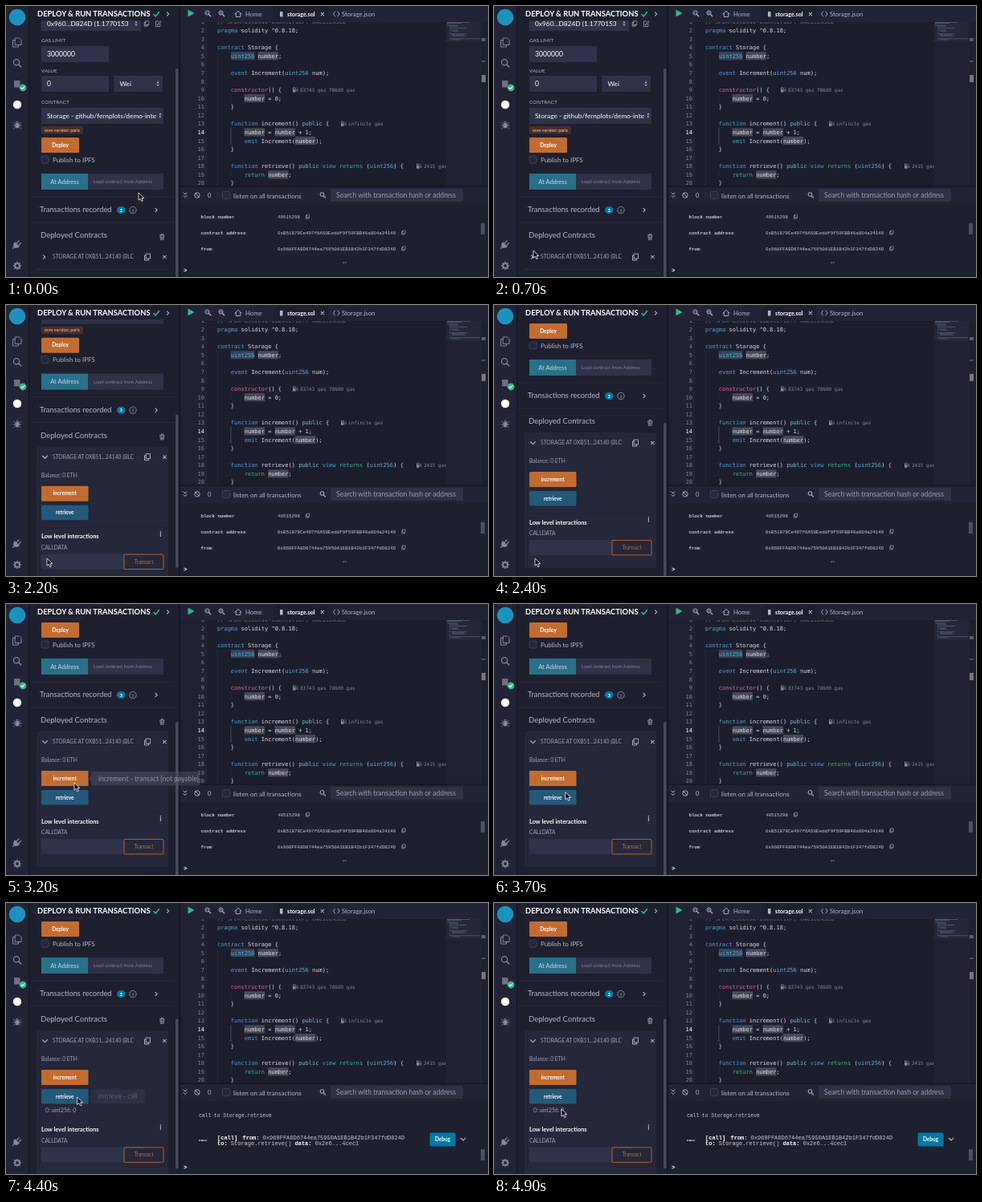
Animation of 600 by 338 pixels, one loop 5 s. Source, as an HTML page:

```html
<!DOCTYPE html>
<html lang="en">
<head>
<meta charset="utf-8">
<title>Deploy and run</title>
<style>
html, body { margin: 0; width: 100%; height: 100%; overflow: hidden; background: #1e2030; }
svg { display: block; width: 600px; height: 338px; }
text { font-family: Lato, "Open Sans", sans-serif; white-space: pre; }
.code { font-family: "DejaVu Sans Mono", monospace; }
.term { font-family: "Liberation Mono", "Courier New", monospace; }
</style>
</head>
<body>
<svg id="stage" viewBox="0 0 600 338">
  <defs>
    <clipPath id="sideClip"><path d="M30 18H216V338H30Z"/></clipPath>
    <clipPath id="codeClip"><path d="M218 20H600V225H218Z"/></clipPath>
    <clipPath id="termClip"><path d="M218 247H600V321H218Z"/></clipPath>
    <clipPath id="selectClip"><path d="M44 127H190V147H44Z"/></clipPath>
  </defs>
  <rect width="600" height="338" fill="#1e2030"/>
  <g id="rail"></g>
  <g clip-path="url(#sideClip)">
    <g id="panel">
      <g id="form"></g>
      <g id="card"><g id="result"></g><g id="lower"></g></g>
      <g id="row"></g>
    </g>
    <rect id="sideThumb" x="211" width="3.6" rx="1" fill="#454a5c"/>
  </g>
  <g id="head"></g>
  <g id="code" clip-path="url(#codeClip)"></g>
  <g id="tools"></g>
  <g clip-path="url(#termClip)">
    <g id="log"></g>
    <rect id="termThumb" x="591" width="5" height="14" fill="#4c4f62"/>
  </g>
  <g id="tipInc"></g>
  <g id="tipGet"></g>
  <path id="cursor" d="M0 0V9.2L2.2 7.2L3.8 10.6L5.4 9.9L3.9 6.6H6.8Z" fill="#000" stroke="#fff" stroke-width=".8" stroke-linejoin="round"/>
</svg>
<script>
const $ = id => document.getElementById(id);
const WHITE = '#fff', PALE = '#b4b6c8', GREY = '#85879a', FIELD = '#2f3248', BASE = '#1e2030';
const CARD = '#25273a', BAR = '#222336', DARK = '#171826', ORANGE = '#c26c31', TEAL = '#2a7089', GREEN = '#32ba89';

const add = (id, ...parts) => $(id).insertAdjacentHTML('beforeend', parts.join(''));
const safe = s => s.replace(/&/g, '&amp;').replace(/</g, '&lt;');
const rect = (x, y, w, h, fill, more = '') =>
  `<rect x="${x}" y="${y}" width="${w}" height="${h}" fill="${fill}" ${more}/>`;
const line = (d, color = PALE, width = 1) =>
  `<path d="${d}" fill="none" stroke="${color}" stroke-width="${width}" stroke-linecap="round" stroke-linejoin="round"/>`;
const fill = (d, color = PALE) => `<path d="${d}" fill="${color}"/>`;
const dot = (x, y, r, color) => `<circle cx="${x}" cy="${y}" r="${r}" fill="${color}"/>`;
const ring = (x, y, r, color = PALE, w = .8) =>
  `<circle cx="${x}" cy="${y}" r="${r}" fill="none" stroke="${color}" stroke-width="${w}"/>`;
// y is the middle of the capitals
const text = (x, y, size, s, color = PALE, more = '') =>
  `<text x="${x}" y="${(y + size * .36).toFixed(2)}" font-size="${size}" fill="${color}" ${more}>${safe(s)}</text>`;
const MID = 'text-anchor="middle" ', BOLD = 'font-weight="700" ', TERM = 'class="term" ';

const copy = (x, y, k = 1, color = PALE) =>
  `<g transform="translate(${x} ${y}) scale(${k})">` +
  line('M-1.5 -4H3.5V2H-1.5ZM-1.5 -2H-3.5V4H1.5V2', color, .9) + '</g>';
const cross = (x, y, r = 1.7) =>
  line(`M${x - r} ${y - r}L${x + r} ${y + r}M${x + r} ${y - r}L${x - r} ${y + r}`, PALE, 1.1);
const right = (x, y, color = PALE) => line(`M${x - 1} ${y - 2.2}L${x + 1.2} ${y}L${x - 1} ${y + 2.2}`, color, 1.1);
const down = (x, y) => line(`M${x - 3} ${y - 1.4}L${x} ${y + 1.6}L${x + 3} ${y - 1.4}`, PALE, 1.2);
const lens = (x, y, r, inner = '') =>
  ring(x, y, r, PALE, 1) + line(`M${x + r * .75} ${y + r * .75}L${x + r * 1.7} ${y + r * 1.7}`, PALE, 1.2) +
  (inner ? line(inner, PALE, .6) : '');
const arrows = (x, y) => fill(`M${x - 1.6} ${y - .8}h3.2l-1.6 -2.1ZM${x - 1.6} ${y + .8}h3.2l-1.6 2.1Z`);
const box = (x, y) => rect(x, y, 9, 9, '#26283b', 'stroke="#44475c" stroke-width=".8" rx="1"');
const button = (x, y, w, h, s, color) =>
  rect(x, y, w, h, color, 'rx="1.5"') + text(x + w / 2, y + h / 2, 6.5, s, WHITE, MID + BOLD);

function drawRail() {
  const spokes = [...Array(8).keys()].map(i => {
    const c = Math.cos(i * Math.PI / 4), s = Math.sin(i * Math.PI / 4);
    return `M${14 + 3.4 * c} ${324 + 3.4 * s}L${14 + 4.4 * c} ${324 + 4.4 * s}`;
  }).join('');
  add('rail', rect(0, 0, 28, 338, BAR), rect(28, 0, 1.5, 338, DARK),
    dot(14, 14, 10.3, '#1c93bd'),
    line('M11.5 40H16.5L19 42.5V48.5H11.5ZM11.5 42.5H8.5V51H15.5V48.5', GREY, 1),
    ring(13, 70.3, 3.6, GREY, 1.2), line('M15.800 73L18.800 76', GREY, 1.4),
    rect(10, 93, 7.5, 8.5, '#6d7080'),
    dot(21, 102, 4.4, GREEN), line('M19 102L20.5 103.5L23 100.5', WHITE, 1.1),
    dot(14, 123, 5.2, WHITE),
    `<ellipse cx="14" cy="149" rx="2.6" ry="3.6" fill="${GREY}"/>`,
    line('M9.500 145.500L11.5 147M18.500 145.500L16.5 147M9 149H19M9.500 153L11.5 151M18.500 153L16.5 151M12.500 144.8Q14 142.8 15.5 144.8', GREY, .9),
    fill('M11 294L17 300Q13 303.5 10 301Q7.8 298 11 294Z', GREY),
    line('M9.8 301L8.5 302.5M13.5 295.5L16 293M16 298L18.5 295.5', GREY, 1.2),
    ring(14, 324, 2.800, GREY, 1.7), line(spokes, GREY, 1.6));
}

function drawForm() {
  add('form',
    rect(44, 11, 124, 20, FIELD), text(51, 22, 8.35, '0x960...D824D (1.1770153', WHITE), arrows(162, 22),
    copy(175, 22, .8), line('M189.500 19H186.500V25.5H192V22.5M188.5 23.5L189 21.8L192.3 18.700L193.3 19.8L190 23Z', PALE, .7),
    text(44, 43, 6.3, 'GAS LIMIT'), rect(44, 50, 84, 20, FIELD), text(51, 60, 8.6, '3000000', WHITE),
    text(44, 80.5, 6.3, 'VALUE'), rect(44, 87, 84, 20, FIELD), text(51, 97, 8.6, '0', WHITE),
    rect(134, 87, 61, 20, FIELD), text(141.500, 97, 8.3, 'Wei', WHITE), arrows(189, 97),
    text(44, 120, 6.5, 'CONTRACT'), rect(44, 127, 152, 20, FIELD),
    '<g clip-path="url(#selectClip)">', text(51, 136.5, 8.35, 'Storage - github/fernplots/demo-inte', WHITE), '</g>',
    arrows(192, 136.5),
    rect(44, 150, 52, 9.500, '#47302b', 'rx="1.5"'),
    text(70, 154.7, 5.5, 'evm version: paris', '#e6a070', MID + BOLD),
    button(44, 164, 47, 19, 'Deploy', ORANGE),
    box(44, 187), text(58, 191.8, 8, 'Publish to IPFS'),
    rect(44, 209, 58, 20, TEAL), text(73, 219, 7.5, 'At Address', '#c9d5de', MID),
    rect(102, 209, 94, 20, FIELD), text(109, 219, 6.05, 'Load contract from Address', GREY),
    line('M30 238H210M30 270H210', '#292b3d', 1),
    text(42, 254, 9.3, 'Transactions recorded'),
    rect(138, 250, 10.5, 9, '#007aa6', 'rx="4.5"'), text(143.3, 254.5, 6, '3', WHITE, MID + BOLD),
    ring(158, 254.5, 4.2, PALE, .7), text(158, 254.5, 6, 'i', PALE, MID + BOLD), right(187, 254.5),
    text(43, 286, 9.5, 'Deployed Contracts'),
    line('M191.500 286H197M193.300 285.500V284.500H195.200V285.500M192 286.500L192.400 291.3H196.100L196.500 286.500M193.6 287.7V290M194.900 287.7V290', PALE, .7),
    line('M38 328.5H202', '#2b2d40', 1));

  add('row', '<g id="closed">', right(47.5, 313), '</g><g id="open">', down(48.5, 313), '</g>',
    text(58, 313, 6.7, 'STORAGE AT 0XB51...24140 (BLC', '#9c9db6'), copy(176, 313), cross(197.5, 313));

  $('card').insertAdjacentHTML('afterbegin',
    `<rect id="cardBox" x="38" y="300" width="164" fill="${CARD}" rx="1"/>` +
    text(44, 336, 6.7, 'Balance: 0 ETH', '#a2a3bd') +
    button(44, 349, 58.5, 19, 'increment', ORANGE) + button(44, 373, 58.5, 18.5, 'retrieve', '#25597a'));
  add('result', text(49, 399.5, 6.8, '0: uint256: 0', '#a2a3bd'));
  add('lower', line('M38 401H202', '#222437', 1),
    text(44, 412, 7.4, 'Low level interactions', WHITE, BOLD), text(192.5, 409, 9, 'i', PALE, MID + BOLD),
    text(44, 426, 6.6, 'CALLDATA', '#a2a3bd'), rect(44, 434, 103, 19, FIELD),
    rect(147, 434.4, 49, 18.5, 'none', `stroke="${ORANGE}" stroke-width=".9" rx="1"`),
    text(171.5, 443.5, 6.6, 'Transact', ORANGE, MID));
}

function drawHead() {
  add('head', text(39, 10, 9.4, 'DEPLOY & RUN TRANSACTIONS', WHITE, BOLD),
    line('M184 10.5L186.3 13L190.5 7.5', GREEN, 1.5), right(201.5, 10),
    rect(215, 0, 2.5, 338, DARK),
    rect(217.5, 0, 383, 20, BAR), rect(333, 0, 68.5, 20, BASE),
    fill('M226.5 4.5L234.5 9L226.5 13.5Z', GREEN),
    lens(250.5, 8.5, 2.5, 'M249.5 8.5H251.5'), lens(267.5, 8.5, 2.5, 'M266.5 8.5H268.5M267.5 7.5V9.5'),
    line('M285 10L289 6.3L293 10M286.3 9.5V13.5H291.7V9.5', PALE, .9),
    text(298, 10, 7.75, 'Home'),
    rect(341, 7, 3.500, 6.500, PALE), text(350, 10, 7.2, 'storage.sol', WHITE, BOLD), cross(394, 10),
    line('M409.5 7L407.5 10L409.5 13M413 7L415 10L413 13', PALE, .9), text(418, 10, 7.7, 'Storage.json'));
}

function drawCode() {
  const src = `// SPDX-License-Identifier: UNLICENSED
pragma solidity ^0.8.18;

contract Storage {
    uint256 number;

    event Increment(uint256 num);

    constructor() {
        number = 0;
    }

    function increment() public {
        number = number + 1;
        emit Increment(number);
    }

    function retrieve() public view returns (uint256) {
        return number;
    }`.split('\n');
  const hues = {};
  const paint = (color, words) => words.split(' ').forEach(w => hues[w] = color);
  paint('#4c9fd0', 'pragma contract event function emit view');
  paint('#5fa8dc', 'uint256');
  paint('#7cc0dc', 'public');
  paint(GREEN, 'return returns');
  paint('#e0668c', 'constructor');
  const adv = 4.214, gas = { 9: [357, '83743 gas 78600 gas'], 13: [417, 'infinite gas'], 18: [511, '2415 gas'] };
  add('code', rect(250, 20, 298, 205, '#1d1e2d'), rect(217.5, 20, 32.5, 205, '#202132'),
    line('M263.3 57V225M280 109V120M280 204V215', '#323447', .6), line('M280 152V173', '#6a6d7d', .6));
  src.forEach((s, i) => {
    const n = i + 1, y = 30.5 + (n - 2) * 10.58;
    for (const m of s.matchAll(n === 5 ? /uint256|number/g : /\bnumber\b/g))
      add('code', rect(263 + m.index * adv, y - 5, m[0].length * adv, 10, m[0] === 'number' ? '#484a57' : '#34465a'));
    const body = n === 1 ? safe(s)
      : safe(s).replace(/\w+/g, w => hues[w] ? `<tspan fill="${hues[w]}">${w}</tspan>` : w);
    add('code', text(247, y, 7, '' + n, n === 14 ? WHITE : '#85879a', 'class="code" text-anchor="end"'),
      `<text class="code" x="263" y="${y + 2.5}" font-size="7" fill="${n === 1 ? '#65727c' : '#dcdde6'}">${body}</text>`);
    if (gas[n]) {
      const [x, s] = gas[n];
      add('code', rect(x, y - 3, 3.5, 6, GREY), rect(x + .8, y - 2.2, 2, 1.5, BASE),
        line(`M${x + 4} ${y}H${x + 5}V${y + 2}H${x + 6}V${y - 1.5}L${x + 5} ${y - 2.5}`, GREY, .6),
        text(x + 9, y, 6, s, GREY, 'class="code"'));
    }
  });
  add('code', rect(547.5, 20, 43, 205, '#202132'), rect(547.5, 20, 43, 25, '#25273a'));
  src.forEach((s, i) => {
    const pad = s.search(/\S/);
    if (pad >= 0) add('code', rect(549 + pad * .75, 20 + i * 1.2, (s.length - pad) * .75, .8, '#566075'));
  });
  add('code', line('M590.8 20V225', '#2c2e40', .6),
    rect(592, 40, 5, 4, '#5d6070'), rect(592, 68, 5, 2, '#4d5062'), rect(592, 86, 5, 9, '#77777e'));
}

function drawTerminal() {
  add('tools', rect(217.5, 224.5, 383, 1.5, DARK), rect(217.5, 226, 383, 21, BAR),
    line('M221 233L223 235L225 233M221 236.5L223 238.5L225 236.5', PALE, 1),
    ring(238, 236, 3.2, PALE, .9), line('M235.8 233.8L240.2 238.2', PALE, .9),
    text(251, 236.5, 7.5, '0'), box(269.5, 231.5), text(283, 236.7, 8.02, 'listen on all transactions'),
    lens(393.5, 235, 2.4), rect(404, 228, 165, 16, '#2f3146'),
    text(411, 236, 8.58, 'Search with transaction hash or address', '#9a9bad'),
    text(221, 329, 7.5, '>', WHITE, TERM + BOLD));

  const from = '0x960FFA8D6744ea75950A1EB1B42b1F347fdD824D';
  const rows = [['block number', '40515298'], ['contract address', '0xB51878Ce497f6A50Eeddf9f59FBB46a804a24140'],
    ['from', from], ['to', 'Storage.(constructor)'], ['gas', '125653 gas'], ['transaction cost', '125653 gas'],
    ['input', '0x608...20033'], ['logs', '[]'], ['val', '0 wei']];
  rows.forEach(([k, v], i) => {
    const y = 263 + i * 19.9;
    add('log', text(242.5, y, 5.85, k, '#c9cad6', TERM + BOLD), text(338, y, 5.85, v, '#c9cad6', TERM),
      copy(338 + v.length * 3.51 + 9.5, y - .3, .62));
  });
  const pair = (x, y, k, v) => text(x, y, 7, k, WHITE, TERM + BOLD) + text(x + (k.length + 1) * 4.2, y, 7, v, '#c9cad6', TERM);
  add('log', text(240, 455, 6.3, 'call to Storage.retrieve', '#c9cad6', TERM),
    text(240, 485, 4.4, 'CALL', WHITE, TERM + BOLD),
    text(263, 482, 7, '[call]', WHITE, TERM + BOLD), pair(294.5, 482, 'from:', from),
    pair(263, 489.5, 'to:', 'Storage.retrieve()'), pair(359.5, 489.5, 'data:', '0x2e6...4cec1'),
    button(527.5, 476.5, 32, 17, 'Debug', '#007aa6'), down(569, 484.5));
}

const tip = (id, y, w, s) => add(id, rect(106, y, w, 17.5, '#4c4f6b', 'rx="2"'),
  fill(`M106 ${y + 6}L103.5 ${y + 8.7}L106 ${y + 11.4}Z`, '#4c4f6b'), text(115, y + 8.7, 8.5, s, WHITE));

drawRail(); drawForm(); drawHead(); drawCode(); drawTerminal();
tip('tipInc', 209, 135, 'increment - transact (not payable)');
tip('tipGet', 232.5, 67, 'retrieve - call');

// tables of [time, value...]
const LOOP = 5000, OPEN = 1800, DONE = 4100;
const POINTER = [[0, 165, 233], [100, 165, 233], [700, 49, 305], [900, 49, 305], [1300, 51, 316], [2500, 51, 316],
  [3050, 85, 223], [3500, 85, 223], [3800, 90, 238], [4250, 90, 238], [4700, 84, 257]];
const SCROLL = [[1900, 0], [2300, 141]], LOG = [[3936, 0], [4336, 190]];
const TIP_INC = [[3050, 0], [3350, 1], [3550, 1], [3700, 0]], TIP_GET = [[3750, 0], [3950, 1], [4300, 1], [4450, 0]];

const ease = p => p < .5 ? 2 * p * p : 1 - 2 * (1 - p) ** 2;
function at(keys, t) {
  const i = keys.findIndex(k => k[0] > t);
  if (i === 0) return keys[0].slice(1);
  if (i < 0) return keys[keys.length - 1].slice(1);
  const a = keys[i - 1], b = keys[i], p = ease((t - a[0]) / (b[0] - a[0]));
  return a.slice(1).map((v, j) => v + (b[j + 1] - v) * p);
}
const show = (id, on) => $(id).setAttribute('visibility', on ? 'visible' : 'hidden');
const move = (id, x, y) => $(id).setAttribute('transform', `translate(${x} ${y})`);

function draw(t) {
  const open = t >= OPEN, done = t >= DONE, grow = done ? 11.5 : 0;
  const [scroll] = at(SCROLL, t), [log] = at(LOG, t);
  const view = 318, full = 389 + (open ? 141 : 0) + grow;
  move('panel', 0, -scroll);
  $('card').style.display = open ? '' : 'none';
  show('closed', !open);
  show('open', open);
  show('result', open && done);
  move('lower', 0, grow);
  $('cardBox').setAttribute('height', 169 + grow);
  $('sideThumb').setAttribute('y', 20 + (71 + scroll) * view / full);
  $('sideThumb').setAttribute('height', view * view / full);
  move('log', 0, -log);
  $('termThumb').setAttribute('y', 271 + log * .19);
  $('tipInc').setAttribute('opacity', at(TIP_INC, t)[0]);
  $('tipGet').setAttribute('opacity', at(TIP_GET, t)[0]);
  move('cursor', ...at(POINTER, t));
}

const start = performance.now();
function tick() {
  const t = (performance.now() - start) % LOOP;
  draw(Math.floor(t / 100) * 100);
  requestAnimationFrame(tick);
}
tick();
</script>
</body>
</html>
```
